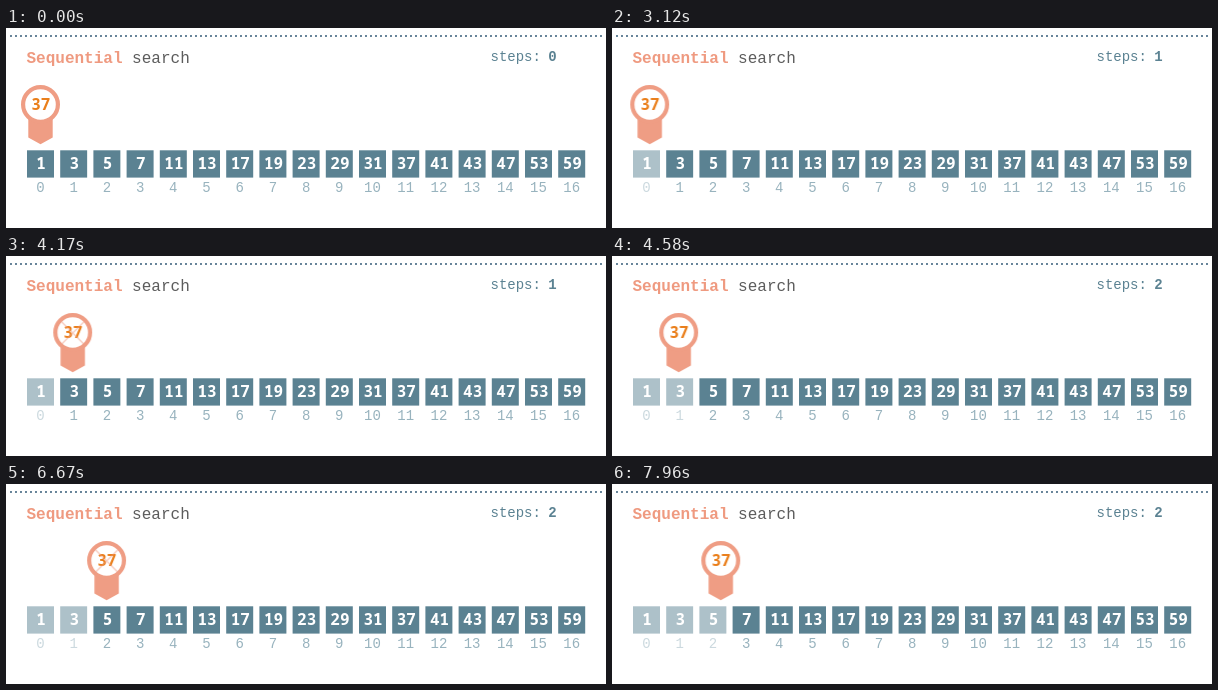
An HTML page that plays this animation: 600 by 200 pixels, repeating every 8 s.

```html
<!DOCTYPE html>
<html lang="en">
<head>
<meta charset="utf-8">
<title>Sequential search</title>
<style>
  html, body { margin: 0; width: 100%; height: 100%; overflow: hidden; background: #fff; }
  svg { display: block; width: 600px; height: 200px; font-family: "Liberation Mono", monospace; }
  .title { font-size: 16px; fill: #5c5c5c; }
  .title tspan { font-weight: 700; fill: #ef9a80; }
  .steps { font-size: 14px; fill: #5b8292; }
  .count { font-weight: 700; animation: 8s step-end infinite; }
  .num { font: 600 16px "Noto Sans Mono", "DejaVu Sans Mono", monospace; text-anchor: middle; fill: #fff; }
  .index { font-size: 14px; text-anchor: middle; fill: #98b3be; }
  .box { fill: #5b8292; }
  .cell { animation: 8s linear infinite; }
  .pin { animation: move 8s linear infinite; }
  .pin .num { fill: #ea7f1b; }
  .cross { stroke: #ef9a80; stroke-width: 1.4; animation: cross 8s linear infinite; }

  @keyframes fade0 { 0%, 15.625% { opacity: 1 } 20.125%, 100% { opacity: .5 } }
  @keyframes fade1 { 0%, 52.125% { opacity: 1 } 57.125%, 100% { opacity: .5 } }
  @keyframes fade2 { 0%, 83.375% { opacity: 1 } 88.375%, 100% { opacity: .5 } }

  @keyframes count0 { 0% { opacity: 1 } 16.6%, 100% { opacity: 0 } }
  @keyframes count1 { 0% { opacity: 0 } 16.6% { opacity: 1 } 53.1%, 100% { opacity: 0 } }
  @keyframes count2 { 0% { opacity: 0 } 53.1%, 100% { opacity: 1 } }

  /* each hop is a quadratic ease-out */
  @keyframes move {
    0% { transform: translateX(34.5px) }
    38.625% { transform: translateX(34.5px); animation-timing-function: cubic-bezier(.3333, .6667, .6667, 1) }
    46.125% { transform: translateX(66.7px) }
    70.19% { transform: translateX(66.7px); animation-timing-function: cubic-bezier(.3333, .6667, .6667, 1) }
    77.56% { transform: translateX(100.6px) }
    98.5% { transform: translateX(100.6px) }
    99.5%, 100% { transform: translateX(108.8px) }
  }
  @keyframes cross {
    0%, 15.62% { opacity: 0 } 15.625% { opacity: .5 } 16.625% { opacity: 1 } 20.125% { opacity: 0 }
    52.12% { opacity: 0 } 52.125% { opacity: .5 } 53.125% { opacity: 1 } 57.125% { opacity: 0 }
    83.37% { opacity: 0 } 83.375% { opacity: .5 } 84.375% { opacity: 1 } 88.375%, 100% { opacity: 0 }
  }
</style>
</head>
<body>
<svg viewBox="0 0 600 200">
  <path d="M5 8H600" stroke="#40657f" stroke-width="2.1" stroke-linecap="round" stroke-dasharray="0 5"/>
  <text class="title" x="20.5" y="35"><tspan>Sequential</tspan> search</text>
  <text class="steps" x="484.5" y="33">steps:</text>
  <g id="counts" class="steps"></g>
  <g id="cells"></g>
  <g class="pin">
    <path d="M-12.2 88H12.2V109.5L0 116.3L-12.2 109.5Z" fill="#ef9d84"/>
    <circle cy="76.5" r="17.4" fill="#fff" stroke="#ef9d84" stroke-width="4.2"/>
    <text class="num" x=".3" y="82">37</text>
    <path class="cross" d="M-11 66L11 88M11 66L-11 88"/>
  </g>
</svg>
<script>
  const primes = [1, 3, 5, 7, 11, 13, 17, 19, 23, 29, 31, 37, 41, 43, 47, 53, 59];
  const gap = 33.2;

  const cell = (n, i) => `
    <g class="cell" transform="translate(${34.5 + gap * i} 0)"${i < 3 ? ` style="animation-name:fade${i}"` : ""}>
      <rect class="box" x="-13.5" y="122.3" width="27" height="27.3"/>
      <text class="num" x=".6" y="141">${n}</text>
      <text class="index" y="164">${i}</text>
    </g>`;
  const count = n => `<text class="count" x="542.3" y="33" style="animation-name:count${n}">${n}</text>`;

  document.getElementById("cells").innerHTML = primes.map(cell).join("");
  document.getElementById("counts").innerHTML = [0, 1, 2].map(count).join("");
</script>
</body>
</html>
```
